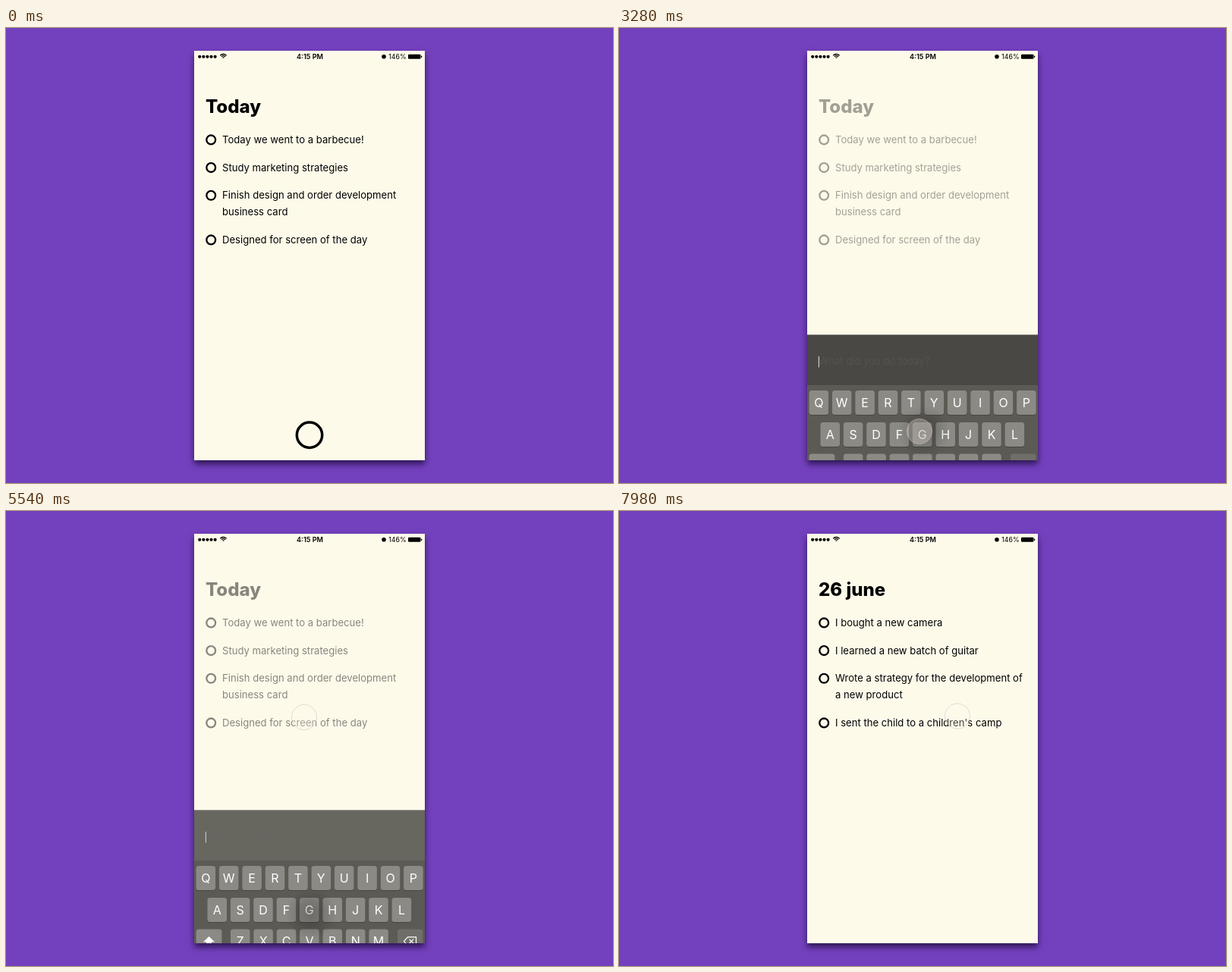
An HTML page with a canvas that plays this animation: 800x600 px, repeating every 8000 ms.

```html
<!DOCTYPE html>
<html lang="en">
<head>
<meta charset="utf-8">
<title>Daily list</title>
<style>
  html, body { margin: 0; width: 100%; height: 100%; overflow: hidden; background: #7441be; }
  #phone { position: absolute; left: 248px; top: 30px; width: 304px; height: 540px;
           box-shadow: 0 5px 8px rgba(12, 0, 35, .68); }
  canvas { position: absolute; left: 0; top: 0; }
</style>
</head>
<body>
<div id="phone"></div>
<canvas id="stage" width="800" height="600"></canvas>
<script>
const LOOP = 8000;
const CREAM = '#fefaea';
const ctx = document.getElementById('stage').getContext('2d');

const clamp = v => Math.min(1, Math.max(0, v));
const mix = (a, b, p) => a + (b - a) * p;
// Decelerating progress from 0 to 1
const easeOut = (t, start, length, power = 2) =>
  1 - Math.pow(1 - clamp((t - start) / length), power);

function text(str, x, y, size, weight = 400, color = '#000', align = 'left') {
  ctx.font = `${weight} ${size}px Inter, Roboto, sans-serif`;
  ctx.fillStyle = color;
  ctx.textAlign = align;
  ctx.fillText(str, x, y);
}

function ring(x, y, r, width, color = '#000', fill) {
  ctx.beginPath();
  ctx.arc(x, y, r, 0, 7);
  if (fill) { ctx.fillStyle = fill; ctx.fill(); }
  ctx.lineWidth = width;
  ctx.strokeStyle = color;
  ctx.stroke();
}

function dot(x, y, r, color = '#000') {
  ctx.beginPath();
  ctx.arc(x, y, r, 0, 7);
  ctx.fillStyle = color;
  ctx.fill();
}

function box(x, y, w, h, r, color) {
  ctx.beginPath();
  ctx.roundRect(x, y, w, h, r);
  ctx.fillStyle = color;
  ctx.fill();
}

function line(points, width = 1.2, close = false) {
  ctx.beginPath();
  points.forEach(([x, y]) => ctx.lineTo(x, y));
  if (close) ctx.closePath();
  ctx.lineWidth = width;
  ctx.strokeStyle = '#fff';
  ctx.stroke();
}

function faded(alpha, draw) {
  if (alpha <= 0) return;
  ctx.save();
  ctx.globalAlpha = alpha;
  draw();
  ctx.restore();
}

function statusBar() {
  for (let i = 0; i < 5; i++) dot(255.2 + i * 5.1, 37.8, 2.1);
  for (const r of [1.3, 3.5, 5.7]) {
    ctx.beginPath();
    ctx.arc(286.5, 40.2, r, -Math.PI * .77, -Math.PI * .23);
    ctx.lineWidth = 1.3;
    ctx.strokeStyle = '#000';
    ctx.stroke();
  }
  text('4:15 PM', 400.5, 41.2, 9.1, 600, '#000', 'center');
  dot(498, 37.7, 2.8);
  text('146%', 527.6, 41.2, 8.8, 400, '#000', 'right');
  box(530, 34.8, 16.5, 6, 1.2, '#000');
  box(547, 36.6, 1.2, 2.4, .6, '#000');
}

const ROWS = [147.4, 184.1, 220.8, 279.4];
const WRAP_ROW = 242.8;
const today = ['Today', 'Today we went to a barbecue!', 'Study marketing strategies',
  'Finish design and order development', 'Designed for screen of the day', 'business card'];
const june = ['26 june', 'I bought a new camera', 'I learned a new batch of guitar',
  'Wrote a strategy for the development of', "I sent the child to a children's camp", 'a new product'];

function list([title, ...items]) {
  text(title, 263, 112.2, 24, 800);
  [...ROWS, WRAP_ROW].forEach((y, i) => {
    text(items[i], 285, y + 4.6, 13.1);
    if (i < 4) ring(270.2, y, 5.9, 2.3);
  });
}

function inputBar(y, alpha) {
  faded(alpha, () => { ctx.fillStyle = '#000'; ctx.fillRect(248, y, 304, 67); });
  faded(Math.pow(alpha, 6), () =>
    text('What did you do today?', 263.3, y + 39.8, 13.1, 400, '#a6a6a6'));
  faded(alpha, () => { ctx.fillStyle = '#fff'; ctx.fillRect(262.8, y + 28.5, 1.2, 14.5); });
}

function key(x, y, w, label = '', size = 16, dark = false) {
  box(x, y + 1, w, 32, 3.5, 'rgba(0,0,0,.22)');
  box(x, y, w, 32, 3.5, dark ? '#706e69' : '#8b8a85');
  text(label, x + w / 2, y + 16 + size * .365, size, 400, '#fff', 'center');
}

function keyIcons(y) {
  // Shift arrow
  ctx.fillStyle = '#fff';
  ctx.beginPath();
  [[267.5, 100], [275, 107.4], [271, 107.4], [271, 112.5], [264, 112.5], [264, 107.4], [260, 107.4]]
    .forEach(([px, py]) => ctx.lineTo(px, y + py));
  ctx.fill();
  // Delete
  line([[524.5, 106.5], [529.5, 101], [540.5, 101], [540.5, 112], [529.5, 112]]
    .map(([px, py]) => [px, y + py]), 1.2, true);
  line([[531.5, y + 103.7], [537, y + 109.3]]);
  line([[537, y + 103.7], [531.5, y + 109.3]]);
  // Smiley
  ring(304.8, y + 146.5, 7, 1.1, '#fff');
  dot(302.3, y + 144, 1.1, '#fff');
  dot(307.3, y + 144, 1.1, '#fff');
  ctx.beginPath();
  ctx.arc(304.8, y + 147.2, 4.4, 0, Math.PI);
  ctx.closePath();
  ctx.stroke();
  // Microphone
  ctx.beginPath();
  ctx.roundRect(336.9, y + 139.5, 4.6, 9, 2.3);
  ctx.stroke();
  ctx.beginPath();
  ctx.arc(339.2, y + 146.5, 4.6, 0, Math.PI);
  ctx.stroke();
  line([[339.2, y + 151], [339.2, y + 153.8]]);
  line([[336.5, y + 153.8], [342, y + 153.8]]);
}

function keyboard(y) {
  ctx.fillStyle = '#5c5a54';
  ctx.fillRect(248, y, 304, 240);
  const letters = [['QWERTYUIOP', 250.5, 7], ['ASDFGHJKL', 265.4, 49], ['ZXCVBNM', 295.9, 90.5]];
  for (const [row, x, dy] of letters)
    [...row].forEach((c, i) => key(x + i * 30.4, y + dy, 25.6, c));
  key(250.5, y + 90.5, 34);
  key(515.8, y + 90.5, 33.7, '', 16, true);
  key(250.5, y + 130.5, 33, '123', 12.5, true);
  key(288.2, y + 130.5, 33.5, '', 16, true);
  key(326.4, y + 130.5, 25.6);
  key(357, y + 130.5, 117, 'space', 11.3);
  key(478.6, y + 130.5, 71, 'return', 11.2, true);
  keyIcons(y);
  // Round button showing softly through the translucent keys
  ctx.save();
  ctx.beginPath();
  ctx.rect(248, y, 304, 240);
  ctx.clip();
  const glow = ctx.createRadialGradient(402, 532, 0, 402, 532, 34);
  glow.addColorStop(0, 'rgba(0,0,0,.22)');
  glow.addColorStop(.5, 'rgba(0,0,0,.13)');
  glow.addColorStop(1, 'rgba(0,0,0,0)');
  ctx.fillStyle = glow;
  ctx.fillRect(360, 490, 84, 80);
  ctx.restore();
}

function pointerAt(t) {
  if (t < 4330) return [
    mix(570, 396, easeOut(t, 1440, 1220, 2.9)),
    mix(132, 532, easeOut(t, 1440, 1220, 2.1))];
  if (t < 6270) {
    const p = easeOut(t, 4330, 600, 1.7);
    return [mix(396, 393, p) + 2.5 * Math.sin(Math.PI * p), mix(532, 272, p)];
  }
  const back = easeOut(t, 6270, 600);
  const swipe = easeOut(t, 7100, 800);
  return [mix(393, 351, back) + 95 * swipe, 271.5 - swipe];
}

function draw(t) {
  const opening = t < 5460;
  const raised = opening ? easeOut(t, 3050, 500) : 1 - easeOut(t, 5460, 615);
  const dim = opening ? raised : 1 - easeOut(t, 5460, 350);
  const swap = clamp((t - 7200) / 400);
  const top = 570 - 233 * raised;

  ctx.clearRect(0, 0, 800, 600);
  ctx.save();
  ctx.beginPath();
  ctx.rect(248, 30, 304, 540);
  ctx.clip();
  ctx.fillStyle = CREAM;
  ctx.fillRect(248, 30, 304, 540);
  statusBar();
  faded((1 - .9 * dim) * (1 - swap), () => list(today));
  faded(swap, () => list(june));
  if (raised > 0) inputBar(top, dim);
  faded(1 - swap, () => ring(400, 536.8, 16.7, 3.5, '#000', CREAM));
  if (raised > 0) keyboard(top + 66.6);
  if (t >= 1440) {
    const [x, y] = pointerAt(t);
    ring(x, y, 16.6, 1, 'rgba(205,192,198,.55)', 'rgba(255,242,234,.28)');
  }
  ctx.restore();
}

const begin = performance.now();
function tick() {
  draw((performance.now() - begin) % LOOP);
  requestAnimationFrame(tick);
}
tick();
</script>
</body>
</html>
```
